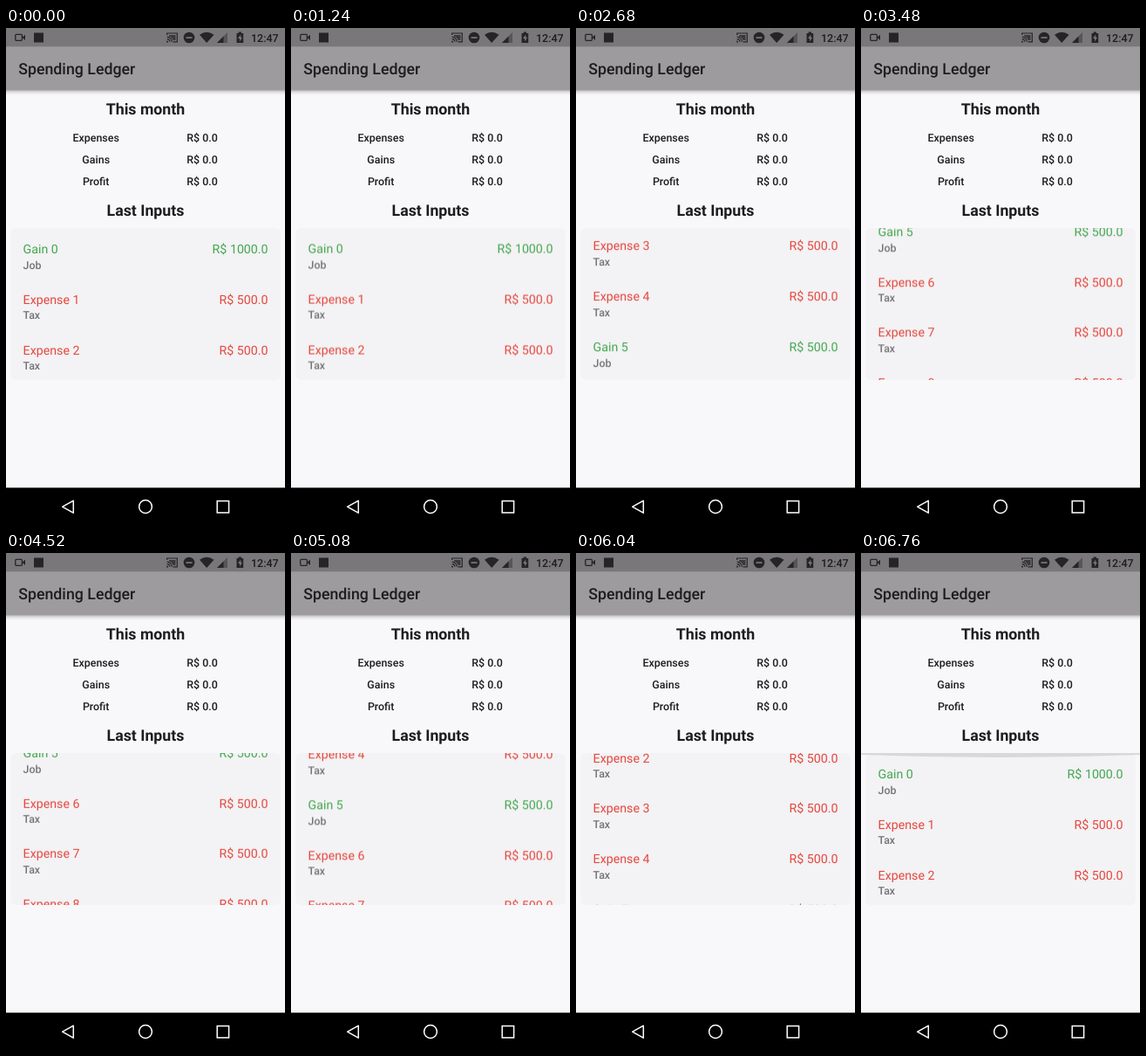
Animation, 320 px wide and 569 px high, one loop 6800 ms. Source, as an HTML page:

```html
<!DOCTYPE html>
<html lang="en">
<head>
<meta charset="utf-8">
<title>Spending Ledger</title>
<style>
  html, body { margin: 0; width: 100%; height: 100%; overflow: hidden; background: #f8f7fa; }
  svg { display: block; width: 100%; height: 100%; }
  text { font: 500 12.44px Roboto, sans-serif; fill: #1d1c1e; text-rendering: geometricPrecision; }
  .title { font-size: 17.78px; }
  .heading { font-size: 17.78px; font-weight: 700; text-anchor: middle; }
  .mid { text-anchor: middle; }
  .name { font-size: 14.22px; font-weight: 400; }
  .end { text-anchor: end; }
  .gain { fill: #43a851; }
  .expense { fill: #e5483f; }
  .kind { fill: #747375; }
  .line { fill: none; stroke: #fff; stroke-width: 1.5; }

  #rows { animation: scroll 6.8s linear infinite; }
  #glow { animation: glow 6.8s linear infinite; transform-origin: 160px 229px; }

  /* Each swipe is a drag followed by a decelerating fling. */
  @keyframes scroll {
    0%, 17.94% { transform: translateY(0); animation-timing-function: cubic-bezier(.45, .1, .8, .6); }
    22.94% { transform: translateY(-28px); animation-timing-function: cubic-bezier(.333, 1.02, .667, .953); }
    32.35%, 35.59% { transform: translateY(-78px); animation-timing-function: cubic-bezier(.4, .2, .7, .7); }
    39.41% { transform: translateY(-176.5px); animation-timing-function: cubic-bezier(.333, 1.02, .667, .953); }
    55.29%, 66.18% { transform: translateY(-313.5px); animation-timing-function: cubic-bezier(.55, .1, .9, .6); }
    74.12% { transform: translateY(-270px); animation-timing-function: cubic-bezier(.333, 1.02, .667, .953); }
    88.82%, 90.88% { transform: translateY(-134px); animation-timing-function: cubic-bezier(.4, .1, .75, .7); }
    96.47%, 100% { transform: translateY(0); }
  }
  @keyframes glow {
    0%, 96.3% { opacity: 0; transform: scaleY(.2); }
    99.41%, 100% { opacity: 1; transform: scaleY(1); }
  }
</style>
</head>
<body>
<svg viewBox="0 0 320 569" preserveAspectRatio="none">
  <defs>
    <linearGradient id="shade" x2="0" y2="1">
      <stop offset="0" stop-color="#000" stop-opacity=".3"/>
      <stop offset=".4" stop-color="#000" stop-opacity=".1"/>
      <stop offset="1" stop-color="#000" stop-opacity="0"/>
    </linearGradient>
    <clipPath id="window"><rect x="0" y="229" width="320" height="174"/></clipPath>
  </defs>

  <rect width="320" height="569" fill="#f8f7fa"/>
  <rect y="71" width="320" height="6" fill="url(#shade)"/>
  <rect width="320" height="71" fill="#9d9b9d"/>
  <rect width="320" height="21.3" fill="#797779"/>

  <!-- status bar -->
  <g fill="#252426">
    <rect x="10.8" y="7.3" width="7.6" height="7" rx="1" fill="none" stroke="#252426" stroke-width="1.3"/>
    <path d="M18.5 10.8L22 7.7V14Z"/>
    <rect x="32" y="5.5" width="11" height="11"/>
    <path d="M184.7 8V6H196.3V15.8H191.5M184.7 10.2A5.8 5.8 0 0 1 190.3 15.8M184.7 12.6A3.2 3.2 0 0 1 187.9 15.8"
          fill="none" stroke="#252426" stroke-width="1.2"/>
    <path d="M187 8H194.5V14H191.5Q190.5 10.5 187 9.5Z" opacity=".75"/>
    <path d="M184.1 14.4A2 2 0 0 1 186.1 16.4H184.1Z"/>
    <circle cx="210" cy="11" r="6.3"/>
    <rect x="206.5" y="10.2" width="7" height="1.7" fill="#797779"/>
    <path d="M222 7.7Q230.2 1.8 238.5 7.7L230.2 17Z"/>
    <path d="M254 5V17H242Z" opacity=".4"/>
    <path d="M249.5 9.5V17H242Z"/>
    <path d="M264.5 6H266.6V4.5H270V6H272.2V17H264.5Z"/>
    <path d="M269.2 7.5L266 12H268V15.5L271 10.8H269.2Z" fill="#797779"/>
  </g>
  <text x="281" y="15.5">12:47</text>

  <text class="title" x="14.2" y="53">Spending Ledger</text>
  <text class="heading" x="160" y="98.7">This month</text>
  <g id="totals"></g>
  <text class="heading" x="160" y="215.3">Last Inputs</text>

  <rect x="5.5" y="229" width="309.5" height="174" rx="6" fill="#f3f2f4"/>
  <g clip-path="url(#window)">
    <g id="rows"></g>
    <path id="glow" d="M0 229H320V231Q160 237 0 231Z" fill="#d8d7d9"/>
  </g>

  <!-- navigation bar -->
  <rect y="526.3" width="320" height="43" fill="#000"/>
  <path class="line" d="M77.3 541.2V555.2L64.7 548.2Z" stroke-linejoin="round"/>
  <circle class="line" cx="160" cy="548" r="7.4"/>
  <rect class="line" x="242.2" y="541.5" width="13.4" height="13.4"/>
</svg>
<script>
  const text = (cls, x, y, words) => `<text class="${cls}" x="${x}" y="${y}">${words}</text>`;
  const PITCH = 57.78;

  document.getElementById('totals').innerHTML = ['Expenses', 'Gains', 'Profit'].map((label, i) => {
    const y = 130 + i * 24.9;
    return text('mid', 103.2, y, label) + text('mid', 225, y, 'R$ 0.0');
  }).join('');

  document.getElementById('rows').innerHTML = Array.from({ length: 9 }, (_, i) => {
    const gain = i % 5 === 0;
    const tone = gain ? 'gain' : 'expense';
    const y = 258 + i * PITCH;
    return text(`name ${tone}`, 19.6, y, `${gain ? 'Gain' : 'Expense'} ${i}`) +
      text(`name end ${tone}`, 300.6, y, `R$ ${i ? 500 : 1000}.0`) +
      text('kind', 19.6, y + 17.7, gain ? 'Job' : 'Tax');
  }).join('');
</script>
</body>
</html>
```
